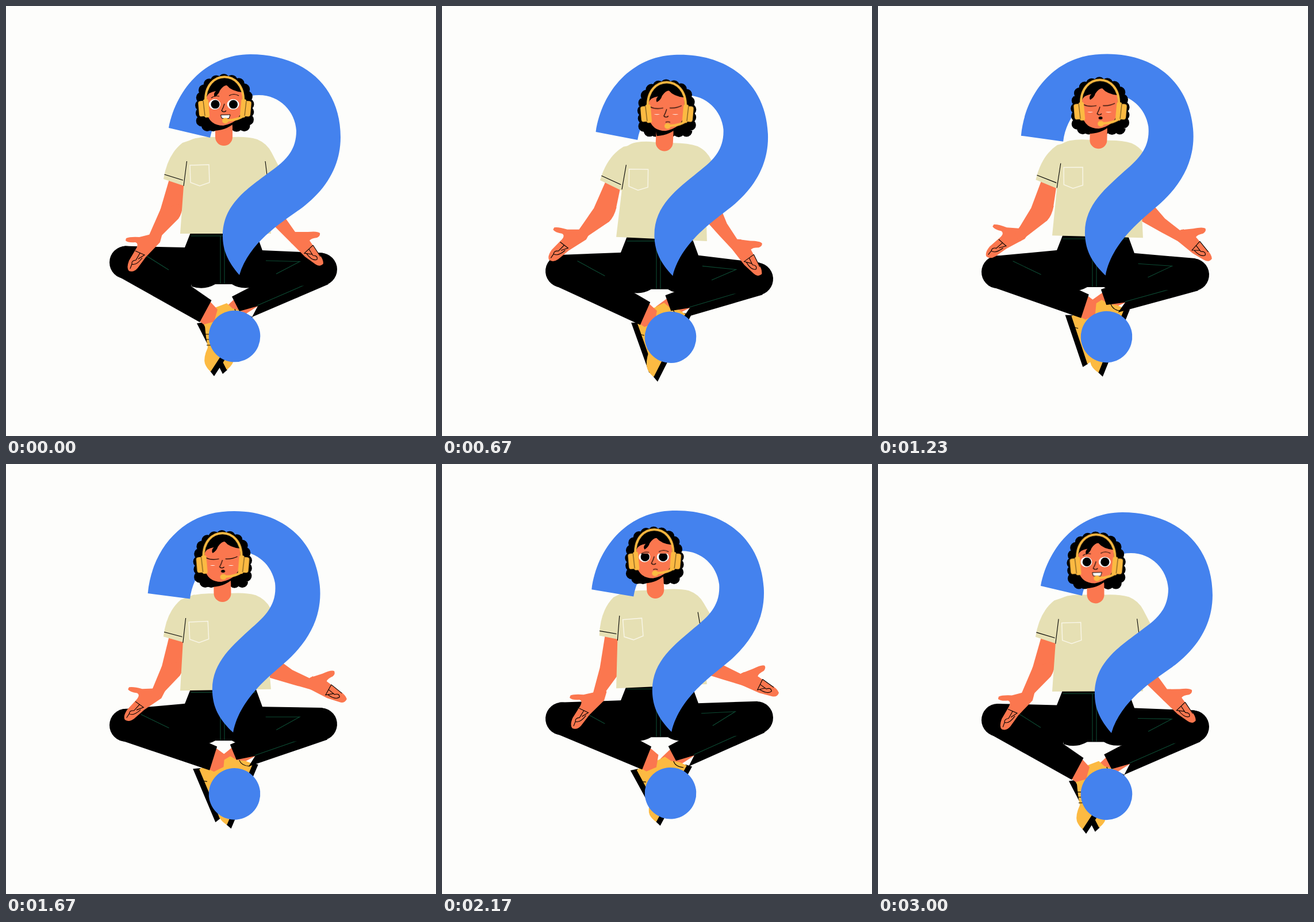
Write an HTML page without scripts that moves like this. It is 748 px wide and 748 px high and loops after 3030 ms.

```html
<!DOCTYPE html>
<html lang="en">
<head>
<meta charset="utf-8">
<title>Calm support agent</title>
<style>
/* --s follows sin(t), --k follows cos(t) - 1; every joint mixes the two */
@property --s { syntax: "<number>"; inherits: true; initial-value: 0; }
@property --k { syntax: "<number>"; inherits: true; initial-value: 0; }
@keyframes sine { from { --s: -1 } to { --s: 1 } }
@keyframes cosine { from { --k: 0 } to { --k: -2 } }

html, body { margin: 0; width: 100%; height: 100%; overflow: hidden; background: #fdfdfb; }
svg {
  display: block; width: 748px; height: 748px;
  animation: sine 1515ms cubic-bezier(.3642,0,.6358,1) -757.5ms infinite alternate,
             cosine 1515ms cubic-bezier(.3642,0,.6358,1) infinite alternate;
}

.blue { fill: #4482ee; }
.skin { fill: #fb774f; }
.gold { fill: #fcba42; }
.shirt { fill: #e6e0b4; }
.ink { fill: none; stroke: #000; stroke-width: 1.1; }
.seam { fill: none; stroke: #0d4a33; stroke-width: 1.1; }

.mark { transform-origin: 397.5px 574.5px; transform: translateY(calc(var(--s) * 1.8px)) rotate(calc(var(--k) * 3deg)); }
.hips { transform: translateY(calc(var(--s) * 9px)); }
.thigh-l { transform-origin: 311px 455px; transform: rotate(calc(var(--k) * 3.4deg - var(--s) * .8deg)); }
.thigh-r { transform-origin: 446px 455px; transform: rotate(calc(var(--s) * 4.5deg)); }
.shin-l { transform-origin: 208.5px 446px; transform: translateY(calc(var(--s) * 10.4px - var(--k) * 6px)) rotate(calc(var(--k) * 5.5deg)); }
.shin-r { transform-origin: 547.5px 458px; transform: translateY(calc(var(--s) * 17px)) rotate(calc(var(--s) * 4.5deg - var(--k) * 3deg)); }
.foot-l {
  transform-origin: 332px 552px;
  transform: translate(calc(var(--k) * 3.5px), calc(var(--k) * 10px + var(--s) * 7px))
    rotate(calc(var(--s) * 7deg - var(--k) * 3deg)) scaleY(calc(1 - var(--s) * .08));
}
.foot-r {
  transform-origin: 428px 541px;
  transform: translate(calc(var(--k) * -5px), calc(var(--k) * 8.5px + var(--s) * 4.5px))
    rotate(calc(var(--k) * 5.5deg)) scaleY(calc(1 + var(--s) * .07));
}
.torso { transform-origin: 379px 396px; transform: translateY(calc(var(--s) * 9.4px)) rotate(calc(var(--s) * 2.7deg)); }
.sleeve { transform-origin: 300px 255px; transform: rotate(calc(var(--s) * 4.8deg)); }
.forearm-l { transform-origin: 290px 352px; transform: rotate(calc(var(--s) * 2.7deg - var(--k) * 1deg)); }
.forearm-r { transform-origin: 505px 402px; transform: rotate(calc(var(--k) * 6deg)); }
.hand-l {
  transform-origin: 208px 406px;
  transform: translate(calc(var(--s) * -14.5px), calc(var(--k) * 10px - var(--s) * 11px))
    rotate(calc(var(--s) * 7.8deg - var(--k) * 7.5deg));
}
.hand-r {
  transform-origin: 545px 396px;
  transform: translate(calc(var(--k) * -13px), calc(var(--k) * 13px + var(--s) * 29px))
    rotate(calc(var(--k) * 7deg + var(--s) * 13deg));
}
.head { transform: translate(calc(var(--s) * 11px), calc(var(--s) * 9.5px)); }

.lid, .open, .shut, .smile, .flat, .breath { animation: 3030ms linear infinite; }
.lid { animation-name: lid; }
.open { animation-name: open; }
.shut { animation-name: shut; }
.smile { animation-name: smile; }
.flat { animation-name: flat; }
.breath { animation-name: breath; }
@keyframes lid {
  0%, 10% { transform: none }
  15%, 67% { transform: translateY(20px) }
  71.6% { transform: translateY(6px) }
  77%, 100% { transform: none }
}
@keyframes open { 0%, 12% { opacity: 1 } 14%, 68% { opacity: 0 } 70%, 100% { opacity: 1 } }
@keyframes shut { 0%, 13.9% { opacity: 0 } 14%, 67.9% { opacity: 1 } 68%, 100% { opacity: 0 } }
@keyframes smile { 0%, 11.9% { opacity: 1 } 12%, 75.9% { opacity: 0 } 76%, 100% { opacity: 1 } }
@keyframes flat {
  0%, 11.9% { opacity: 0 }
  12%, 29.9% { opacity: 1 }
  30%, 62.9% { opacity: 0 }
  63%, 75.9% { opacity: 1 }
  76%, 100% { opacity: 0 }
}
@keyframes breath { 0%, 29.9% { opacity: 0 } 30%, 62.9% { opacity: 1 } 63%, 100% { opacity: 0 } }
</style>
</head>
<body>
<svg viewBox="0 0 748 748">
  <clipPath id="eye"><rect class="lid" x="345" y="159" width="70" height="22"/></clipPath>

  <!-- feet -->
  <g class="foot-l">
    <path d="M332 552L345 550L385 633L377 640Z"/>
    <path class="gold" d="M343 552L384 633Q396 624 397 612L385 560L362 530Q352 548 343 552Z"/>
    <path class="ink" d="M347 571L358 572"/>
  </g>
  <g class="shin-r">
    <path class="skin" d="M396 511L379 527L385 540L410 540L440 521Z"/>
  </g>
  <g class="foot-r">
    <path d="M429 541L418 536L355 635L362 644Z"/>
    <path class="gold" d="M420 538L408 530L394 526L384 517L363 525Q346 540 346 556Q347 572 351 594Q343 612 346 622Q349 630 356 636Z"/>
    <path class="ink" d="M347 571H355M348 580H356M349 590H357M398 527Q400 538 414 541"/>
  </g>

  <!-- legs -->
  <g class="shin-l">
    <path class="skin" d="M355 514L368 528L362 549L344 554L336 548Z"/>
    <path d="M194.500 470L337 550L357.500 512L225 420Z"/>
    <circle cx="208.500" cy="446" r="28.500"/>
  </g>
  <g class="shin-r">
    <path d="M393 505.500L406 531L438 522L428 541L561 484L535 432Z"/>
    <circle cx="547.500" cy="458" r="28.500"/>
    <path class="seam" d="M437 521L543 475"/>
  </g>
  <g class="hips">
    <path d="M322 392L311 420L323 488Q345 495 364 484H393Q410 495 438 487L446 425L434 392Z"/>
    <g class="thigh-l">
      <path d="M332 420H311L206 417.500L209 474L322 489Z"/>
      <path class="seam" d="M237 430L283 459"/>
    </g>
    <g class="thigh-r">
      <path d="M425 425H446L551 429.500L548 486L438 488Z"/>
      <path class="seam" d="M452 443L511 444.500L470 466"/>
    </g>
    <path class="seam" d="M322 400H434M373 400V483M380 400V483"/>
  </g>

  <!-- hands -->
  <g class="hand-l">
    <path class="skin" d="M209 404Q216 401 232 402L252 397L259 380L272 396L268 411L243 437L229 456Q222 464 214 461Q209 456 214 443L227 421Q231 413 225 411Q212 412 208 408Z"/>
    <path class="ink" d="M225 426L241 433L230 440M233 430L226 442Q218 443 219 449Q227 452 237 438M219 449L216 457"/>
  </g>
  <g class="hand-r">
    <path class="skin forearm-r" d="M510 393L503 393L484 366L470 335L440 355L472 388L497 413L510 418Z"/>
    <path class="skin" d="M546 395Q542 391 525 393L503 393L490 404L497 413L520 436L538 449Q546 455 552 448Q552 440 545 432L528 408Q531 404 541 403Q547 400 546 395Z"/>
    <path class="ink" d="M534 416L519 430L533 432M527 423L534 434Q543 434 541 441Q533 444 523 431M534 416L547 436"/>
  </g>

  <!-- torso -->
  <g class="torso">
    <g class="sleeve">
      <path class="skin" d="M285 298L311 306L308 345L300 368L268 356Z"/>
      <path class="skin forearm-l" d="M269 353L308 343Q307 360 300 370L258 412L247 403Z"/>
      <path class="shirt" d="M274 301Q281 258 307 238L331 230L325 318Z"/>
      <path class="ink" d="M275.500 293L311 304"/>
    </g>
    <path class="shirt" d="M309 313L303 260Q306 236 330 230Q345 227 362 228H396Q420 227 437 232Q454 239 462 255Q475 280 488 305L454 302L461 396H303Z"/>
    <path class="ink" d="M314.500 270L309 313M451 270L455 302"/>
    <path d="M320 277L353 276L354 307L337 313L321 307Z" fill="none" stroke="#f8f5e6" stroke-width="1.500"/>
  </g>

  <g class="mark blue">
    <path d="M283 212C297 140 352 84 425 84C515 84 582 137 582 228C582 275 560 315 520 347C490 371 425 405 406 468C386 445 377 425 377 400C377 345 420 318 457 290C482 272 505 255 505 217C503 183 476 155 440 155C400 155 365 185 355 229Z"/>
    <circle cx="397.500" cy="574.500" r="44.800"/>
  </g>

  <!-- head -->
  <g class="head">
    <path d="M350 208Q338 206 341 192Q337 175 341 158Q346 130 380 128Q414 130 419 158Q424 175 420 192Q424 206 412 209Z"
      stroke="#000" stroke-width="20" stroke-linecap="round" stroke-dasharray="0 13.500"/>
  </g>
  <g class="torso"><rect class="skin" x="364" y="195" width="30" height="48" rx="15"/></g>
  <g class="head">
    <path d="M360 203L400 200Q388 215 363 217Z"/>
    <path class="skin" d="M349 158Q352 150 365 148Q360 153 363 158Q370 154 372 147Q378 138 384 138Q392 148 411 150V180Q405 203 378 208Q354 208 349 185Z"/>
    <g clip-path="url(#eye)">
      <ellipse cx="363" cy="171" rx="10" ry="9" fill="#fff"/>
      <ellipse cx="395" cy="171" rx="10.500" ry="9" fill="#fff"/>
      <circle cx="364" cy="171" r="7.600"/>
      <circle cx="395.500" cy="171" r="7.600"/>
    </g>
    <g class="lid"><path class="ink open" d="M357 160Q363 155 371 157M388 156Q396 151 405 156"/></g>
    <path class="ink shut" d="M351 166Q361 171 374 168M385 168Q396 169 406 164"/>
    <path class="ink" d="M380 170Q378 177 375 182Q379 186 383 182"/>
    <path class="smile" d="M373.500 189.500L390 189L388 195.500Q381 197 375 195Z" fill="#fff" stroke="#000"/>
    <path class="ink flat" d="M378 193Q382 191 386 193"/>
    <ellipse class="breath" cx="381" cy="189.500" rx="3.500" ry="2.500"/>
    <path d="M347 166C345 109 415 109 413 166" fill="none" stroke="#fcba42" stroke-width="4"/>
    <path d="M417 188Q405 199 383 199" fill="none" stroke="#fcba42" stroke-width="4"/>
    <ellipse class="gold" cx="381.500" cy="199.500" rx="5.500" ry="5"/>
    <g class="gold">
      <rect x="335" y="165" width="13" height="27" rx="4" transform="rotate(-5 341 178)"/>
      <rect x="344" y="162" width="9" height="32" rx="3" transform="rotate(-5 348 178)"/>
      <rect x="413" y="165" width="13" height="27" rx="4" transform="rotate(5 419 178)"/>
      <rect x="408" y="162" width="9" height="32" rx="3" transform="rotate(5 412 178)"/>
    </g>
    <path class="ink" d="M343 165L346 191M418 165L415 191" stroke-opacity=".6"/>
  </g>
</svg>
</body>
</html>
```
